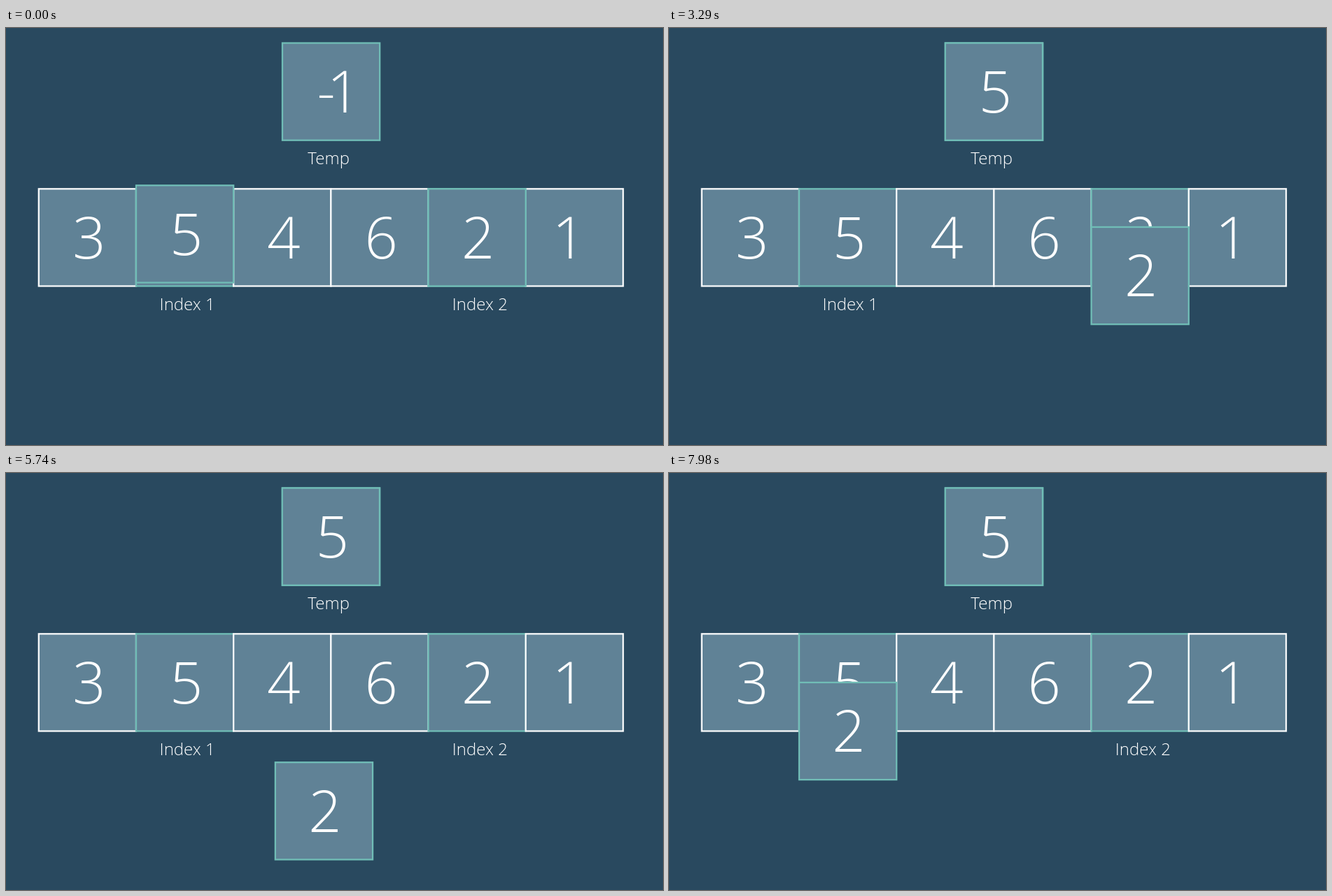
Recreate the animation shown at these times as an HTML page with a canvas. Size 939x597 px, loop 8 s.

```html
<!DOCTYPE html>
<html lang="en">
<head>
<meta charset="utf-8">
<title>Swapping two array values</title>
<style>
  html, body { margin: 0; width: 100%; height: 100%; overflow: hidden; background: #29495f; }
  canvas { display: block; }
</style>
</head>
<body>
<canvas id="stage" width="939" height="597"></canvas>
<script>
const ctx = document.getElementById('stage').getContext('2d');
const LOOP = 8000, STEP = 70;
const SPEED = 4.971;               // pixels per tick, two ticks per step
const SIZE = 139.2, ROW_X = 46.8, ROW_Y = 230.3;
const TEMP_X = 395, TEMP_Y = ROW_Y - 42 * SPEED;
const WHITE = '#f8fafb', GREEN = '#70bdb6';
const VALUES = ['3', '5', '4', '6', '2', '1'];
const INK_CENTER = { '1': 56, '2': 70.3, '3': 71 };

// Each leg: first tick, number of ticks, direction x, direction y
const FIRST_PATH = [[-1, 42, 0, -1], [41, 42, 1, 0]];
const SECOND_PATH = [[83, 37, 0, 1], [120, 84, -1, 0], [205, 37, 0, -1]];

const cellX = i => ROW_X + i * SIZE;

function text(str, center, baseline, size, spacing = 0) {
  ctx.font = `300 ${size}px "Open Sans", sans-serif`;
  ctx.letterSpacing = `${spacing}px`;
  const m = ctx.measureText(str);
  const inkMiddle = (m.actualBoundingBoxRight - m.actualBoundingBoxLeft) / 2;
  ctx.fillStyle = '#fff';
  ctx.fillText(str, center - inkMiddle, baseline);
}

function tile(value, x, y, border) {
  ctx.fillStyle = '#608296';
  ctx.fillRect(x, y, SIZE, SIZE);
  ctx.strokeStyle = border;
  ctx.lineWidth = 2.3;
  ctx.strokeRect(x, y, SIZE, SIZE);
  text(value, x + (INK_CENTER[value] || 72), y + 99.3, 83, -12);
}

function moving(value, index, path, tick) {
  let x = cellX(index), y = ROW_Y;
  for (const [start, length, dx, dy] of path) {
    const travel = SPEED * Math.min(length, Math.max(0, tick - start));
    x += dx * travel;
    y += dy * travel;
  }
  tile(value, x, y, GREEN);
}

function draw(time) {
  const tick = 2 * Math.floor((time % LOOP) / STEP);
  ctx.fillStyle = '#29495f';
  ctx.fillRect(0, 0, 939, 597);

  tile('-1', TEMP_X, TEMP_Y, GREEN);
  VALUES.forEach((v, i) => tile(v, cellX(i), ROW_Y, i === 1 || i === 4 ? GREEN : WHITE));
  text('Temp', 460.5, 195, 24);
  text('Index 1', 257.3, 404, 24);
  text('Index 2', 678, 404, 24);

  moving('5', 1, FIRST_PATH, tick);
  moving('2', 4, SECOND_PATH, tick);
}

const began = performance.now();
function frame() {
  draw(performance.now() - began);
  requestAnimationFrame(frame);
}
frame();
</script>
</body>
</html>
```
